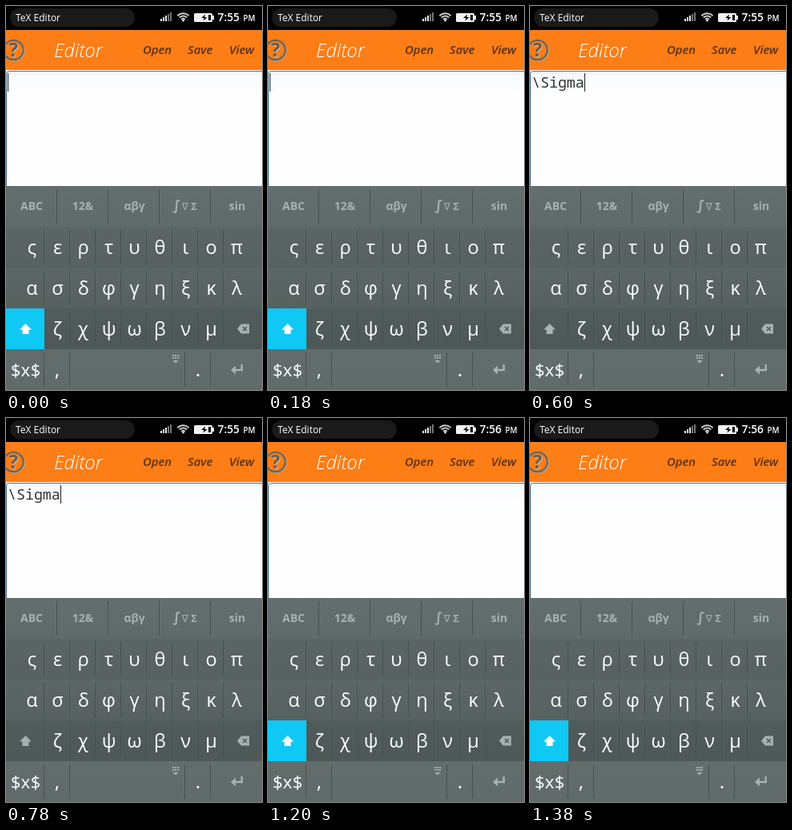
An HTML page with a canvas for the animation above (1.5 s loop, 320x480 px).

```html
<!DOCTYPE html>
<html lang="en">
<head>
<meta charset="utf-8">
<title>Greek keyboard</title>
<style>
html, body { margin: 0; width: 100%; height: 100%; overflow: hidden; background: #000; }
canvas { display: block; width: 320px; height: 480px; }
</style>
</head>
<body>
<canvas id="stage"></canvas>
<script>
const W = 320, H = 480, LOOP = 1500;
const SANS = '"Open Sans", "Noto Sans", "DejaVu Sans", sans-serif';
const MONO = '"Noto Sans Mono", "DejaVu Sans Mono", monospace';
const CYAN = '#10c8f4', ICON = '#a9b0b0', PRESSED = '#4b4c4f', ORANGE = '#fd7d16';
const ROWS = ['ςερτυθιοπ', 'ασδφγηξκλ', 'ζχψωβνμ'];

const canvas = document.getElementById('stage');
const ctx = canvas.getContext('2d');
const dpr = window.devicePixelRatio || 1;
canvas.width = W * dpr;
canvas.height = H * dpr;

function rect(x, y, w, h, color) {
  ctx.fillStyle = color;
  ctx.fillRect(x, y, w, h);
}

function text(str, x, y, font, color, align = 'left') {
  ctx.font = font;
  ctx.fillStyle = color;
  ctx.textAlign = align;
  ctx.fillText(str, x, y);
}

function label(str, x, y, size, color = '#fff') {
  text(str, x, y, `500 ${size}px ${SANS}`, color, 'center');
}

function poly(points, color) {
  ctx.beginPath();
  points.forEach(([x, y]) => ctx.lineTo(x, y));
  ctx.closePath();
  ctx.fillStyle = color;
  ctx.fill();
}

function disc(x, y, r, color) {
  ctx.beginPath();
  ctx.arc(x, y, r, 0, Math.PI * 2);
  ctx.fillStyle = color;
  ctx.fill();
}

function ring(x, y, r, width, color, from = 0, to = Math.PI * 2) {
  ctx.beginPath();
  ctx.arc(x, y, r, from, to);
  ctx.lineWidth = width;
  ctx.strokeStyle = color;
  ctx.stroke();
}

function round(x, y, w, h, r, color) {
  ctx.beginPath();
  ctx.roundRect(x, y, w, h, r);
  ctx.fillStyle = color;
  ctx.fill();
}

function shade(y, h, top, bottom) {
  const g = ctx.createLinearGradient(0, y, 0, y + h);
  g.addColorStop(0, top);
  g.addColorStop(1, bottom);
  rect(0, y, W, h, g);
}

function divider(x, y, h) {
  rect(x - 1, y, 1, h, '#465150');
}

function statusBar(clock) {
  rect(0, 0, W, 30, '#000');
  round(5, 3, 156, 23, 11.5, '#1a1a1a');
  text('TeX Editor', 12, 19, `12px ${SANS}`, '#fff');

  for (let i = 0; i < 5; i++) {
    const h = 3 + i * 2;
    rect(193 + i * 3, 19 - h, 2, h, i < 3 ? '#e8e8e8' : '#777');
  }

  for (let i = 0; i < 3; i++) {
    ring(221.5, 19, 3.2 + i * 3.3, 2, '#c8c8c8', -Math.PI * 0.76, -Math.PI * 0.24);
  }
  disc(221.5, 18, 1.6, '#c8c8c8');

  round(235, 9, 23, 11, 1.5, '#f2f2f2');
  rect(258, 12, 2, 5, '#f2f2f2');
  rect(253, 11, 3, 7, '#000');
  poly([[249, 10.5], [244, 15], [247.5, 15], [246.5, 18.5], [251.5, 14], [248.3, 14]], '#000');

  text(clock, 264.5, 19, `600 13.8px ${SANS}`, '#fff');
  text('PM', 296.5, 19, `600 9.8px ${SANS}`, '#fff');
}

function header() {
  rect(0, 30, W, 50, ORANGE);
  ring(10, 55.5, 12.6, 2, '#b0b5ac');
  ring(9.5, 55, 12.2, 2.2, '#66655f');
  text('?', 10.5, 63.8, `bold 23px ${SANS}`, '#bcc1bb', 'center');
  text('?', 9.5, 63, `bold 23px ${SANS}`, '#5f5e59', 'center');

  text('Editor', 60, 63.5, `italic 300 24px ${SANS}`, '#fff');
  const font = `italic 600 14.8px ${SANS}`;
  text('Open', 171, 60, font, '#5a3111');
  text('Save', 227, 60, font, '#5a3111');
  text('View', 279, 60, font, '#5a3111');
}

function editor(typed, caret) {
  rect(0, 80, W, 145, '#fefefe');
  const glow = ctx.createLinearGradient(0, 82, 0, 110);
  glow.addColorStop(0, '#e4eff8');
  glow.addColorStop(0.15, '#f7fbff');
  glow.addColorStop(1, '#fefefe');
  rect(1, 82, W - 1, 28, glow);
  ctx.beginPath();
  ctx.roundRect(0.5, 81.5, W + 6, 160, 3);
  ctx.lineWidth = 1;
  ctx.strokeStyle = '#4c7792';
  ctx.stroke();

  text(typed, 2, 102, `18.3px ${MONO}`, '#333');
  if (caret) rect(typed ? 68 : 2, 84, 1, 23, '#222');
}

function tabs() {
  shade(225, 51, '#636f6e', '#5f6a69');
  const font = `bold 14px ${SANS}`;
  [['ABC', 32], ['12&', 96], ['αβγ', 160.5], ['sin', 289]].forEach(([s, x]) =>
    text(s, x, 255, font, ICON, 'center'));
  text('∫', 213.5, 255, `bold 17px "DejaVu Sans", sans-serif`, ICON, 'center');
  text('∇', 223.8, 255, `12px "DejaVu Sans", sans-serif`, ICON, 'center');
  text('Σ', 235, 255, `bold 13px ${SANS}`, ICON, 'center');
  for (let x = 64; x < W; x += 64) divider(x, 229, 43);
}

function shiftKey(on) {
  if (on) rect(0, 378, 48, 51, CYAN);
  poly([[24.5, 397], [32, 404.5], [28.5, 404.5], [28.5, 410], [20.5, 410],
    [20.5, 404.5], [17, 404.5]], on ? '#fff' : ICON);
}

function deleteKey(down) {
  if (down) rect(272, 378, 48, 51, PRESSED);
  poly([[289, 403.5], [294, 397.5], [304, 397.5], [304, 409.5], [294, 409.5]],
    down ? '#08b4dc' : ICON);
  ctx.beginPath();
  ctx.moveTo(296, 401);
  ctx.lineTo(301, 406);
  ctx.moveTo(301, 401);
  ctx.lineTo(296, 406);
  ctx.lineWidth = 1.6;
  ctx.strokeStyle = down ? PRESSED : '#4f5b5a';
  ctx.stroke();
}

function bottomRow() {
  label('$x$', 24.5, 462.5, 22.5);
  label(',', 64, 462.5, 24);
  label('.', 240, 462.5, 24);
  [48, 80, 224, 256].forEach(x => divider(x, 433, 43));

  for (let r = 0; r < 2; r++)
    for (let c = 0; c < 3; c++) rect(208 + c * 3, 436 + r * 3, 2, 2, ICON);
  poly([[208.5, 443], [215.5, 443], [212, 446.5]], ICON);

  poly([[281, 455], [287, 449.5], [287, 453.7], [293.5, 453.7], [293.5, 448],
    [296, 448], [296, 456.3], [287, 456.3], [287, 460.5]], ICON);
}

function keyboard(state) {
  tabs();
  shade(276, 51, '#5a6564', '#566160');
  shade(327, 51, '#5b6665', '#566160');
  shade(378, 51, '#505c5b', '#4d5857');
  shade(429, 51, '#626d6c', '#5f6a69');

  if (state.sigma) rect(48, 327, 32, 51, PRESSED);
  ROWS.forEach((keys, row) => {
    const y = 276 + row * 51, start = row === 2 ? 64 : 32;
    for (let x = 48; x < 288; x += 32) divider(x, y + 4, 43);
    [...keys].forEach((key, i) => {
      const lit = state.sigma && key === 'σ';
      label(key, start + i * 32 + 0.5, y + 34, 23.5, lit ? '#08acd0' : '#fff');
    });
  });
  shiftKey(state.shift);
  deleteKey(state.erase);
  bottomRow();

  if (state.sigma) {
    disc(64, 301, 28, '#08a8cc');
    label('σ', 64.5, 311, 28);
  }
}

// Tap sigma with shift on, get the command, then erase it.
function stateAt(t) {
  const written = t >= 600 && t < 1200;
  return {
    sigma: t >= 300 && t < 600,
    shift: !written,
    erase: t >= 900 && t < 1200,
    typed: written ? '\\Sigma' : '',
    caret: t < 1200,
    clock: t < 900 ? '7:55' : '7:56'
  };
}

function draw(now) {
  const state = stateAt(now % LOOP);
  ctx.setTransform(dpr, 0, 0, dpr, 0, 0);
  statusBar(state.clock);
  header();
  editor(state.typed, state.caret);
  keyboard(state);
}

const begin = performance.now();
function tick() {
  draw(performance.now() - begin);
  requestAnimationFrame(tick);
}
tick();
</script>
</body>
</html>
```
